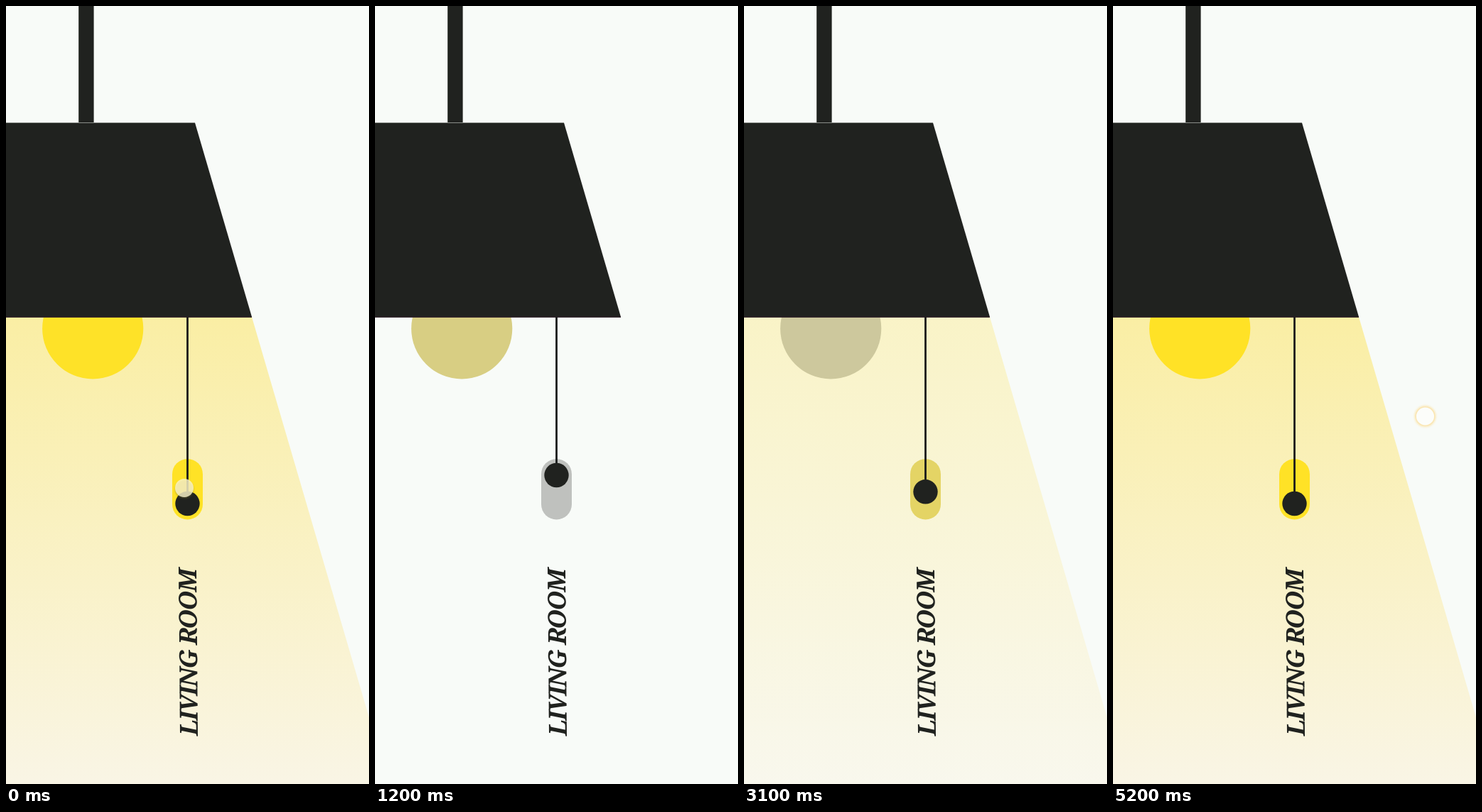
These frames come from a looping animation (511x1096 px, 5700 ms). An HTML page:

```html
<!DOCTYPE html>
<html lang="en">
<head>
<meta charset="utf-8">
<title>Lamp switch</title>
<style>
  html, body { margin: 0; width: 100%; height: 100%; overflow: hidden; background: #f8fbf8; }
  svg { display: block; width: 100%; height: 100%; }
  .ink { fill: #20221f; }
  text { font: italic 700 35px "Noto Serif", serif; letter-spacing: -1.7px; }
</style>
</head>
<body>
<svg viewBox="0 0 511 1096">
  <defs>
    <linearGradient id="glow" x1="0" y1="0" x2="0" y2="1">
      <stop offset="0" stop-color="#faeea4"/>
      <stop offset="1" stop-color="#f9f5e5"/>
    </linearGradient>
    <radialGradient id="press">
      <stop offset="0" stop-color="#a9aba7"/>
      <stop offset=".5" stop-color="#c8c9c5"/>
      <stop offset="1" stop-color="#f4f4ec"/>
    </radialGradient>
    <filter id="soft" x="-50%" y="-50%" width="200%" height="200%">
      <feGaussianBlur stdDeviation="1.2"/>
    </filter>
  </defs>

  <path id="light" d="M0 438H346L538.500 1096H0Z" fill="url(#glow)"/>
  <circle id="bulb" cx="122.200" cy="454.300" r="71.100"/>
  <rect class="ink" x="102.200" y="0" width="21.400" height="164"/>
  <path class="ink" d="M0 164.500H266L346.200 438.500H0Z"/>
  <path d="M0 438H346" stroke="#2a1d24" stroke-width="1.300"/>

  <rect id="track" x="234" y="638" width="43" height="85.500" rx="21.500"/>
  <path id="cord" stroke="#191b1b" stroke-width="2.800"/>
  <circle class="ink" id="knob" cx="255.500" r="17.200"/>
  <text class="ink" transform="translate(270 1028) rotate(-90.500)">LIVING ROOM</text>

  <g id="tap" transform="translate(251 679)">
    <circle cy="2" r="13" fill="#6b6528" opacity=".35" filter="url(#soft)"/>
    <circle r="13" fill="#fbf5cd" opacity=".8"/>
  </g>
  <g id="hold" transform="translate(263.500 664.500)">
    <circle r="13" fill="url(#press)" stroke="#d9c652" stroke-width="1.200"/>
  </g>
  <g id="rest" transform="translate(439.500 578)">
    <circle r="14" fill="none" stroke="#fbe3a6" stroke-width="3" opacity=".6" filter="url(#soft)"/>
    <circle r="13.300" fill="#fcfdfa" stroke="#fae6b4" stroke-width="1.500"/>
  </g>
</svg>
<script>
const LOOP = 5700, STEP = 100;
const GREY = [191, 193, 190], YELLOW = [255, 226, 38];
const el = id => document.getElementById(id);
const span = (t, start, length) => Math.min(1, Math.max(0, (t - start) / length));
const tint = p => `rgb(${GREY.map((g, i) => Math.round(g + (YELLOW[i] - g) * p))})`;
const easeInOut = x => x * x * (3 - 2 * x);
const easeOut = x => 1 - (1 - x) ** 1.5;

const cursors = [["tap", 0, 100], ["hold", 2700, 2900], ["rest", 5200, LOOP]];

function draw(t) {
  const power = 1 - easeInOut(span(t, 0, 630)) + easeInOut(span(t, 2750, 630));
  const warmth = 1 - span(t, -30, 2020) + easeOut(span(t, 2780, 2100));
  const y = 661 + 40 * power;

  el("light").style.opacity = power;
  el("track").style.fill = tint(power);
  el("bulb").style.fill = tint(warmth);
  el("knob").setAttribute("cy", y);
  el("cord").setAttribute("d", `M255.500 438V${y - 10}`);
  for (const [id, from, to] of cursors)
    el(id).style.display = t >= from && t < to ? "" : "none";
}

let start;
function tick(now) {
  start ??= now;
  const t = (now - start) % LOOP;
  draw(Math.floor(t / STEP) * STEP);
  requestAnimationFrame(tick);
}
draw(0);
requestAnimationFrame(tick);
</script>
</body>
</html>
```
